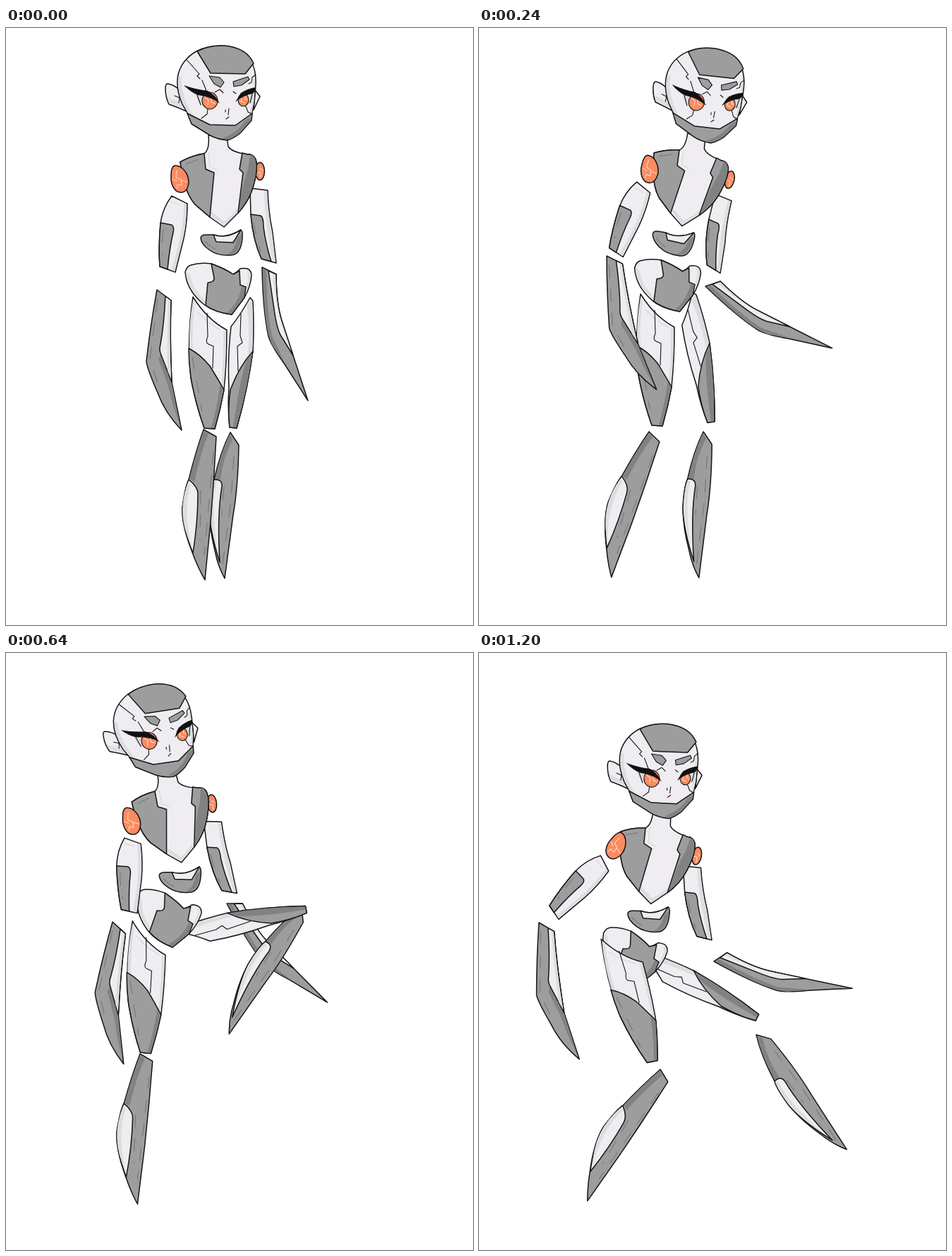
These frames come from a looping animation (662x846 px, 1.32 s). An HTML page:

```html
<!DOCTYPE html>
<html lang="en">
<head>
<meta charset="utf-8">
<title>Robot poses</title>
<style>
html, body { margin: 0; width: 100%; height: 100%; overflow: hidden; background: #fff }
svg { display: block; width: 100%; height: 100% }
path, ellipse { fill: none; stroke: #151515; stroke-width: 1.5; stroke-linejoin: round; stroke-linecap: round }
.light { fill: #efedf1 }
.dark { fill: #9d9d9d }
.orange { fill: #fb8b60 }
.ink { fill: #111; stroke: none }
.shade { fill: #dddddf; stroke: none }
.deep { fill: #828282; stroke: none }
.glow { stroke: #ffd3bd; stroke-width: 1.2 }
.fine { stroke-width: 1.1 }
.scuff { stroke: #777; stroke-width: 1.1; stroke-dasharray: 18 16 }
.soft { stroke: #d8d8da; stroke-width: 1.3 }
</style>
</head>
<body>
<!-- data-pin: the joint a part turns about; data-on: the part that carries this joint -->
<svg viewBox="0 0 662 846">
  <g id="forearmR" data-pin="363 339">
    <path class="dark" d="M363 339L383 349Q383 390 391 415L407 464L428 528L394 475Q376 450 372 437Q364 400 363 339Z"/>
    <path class="deep" d="M364 340L369 343Q370 405 377 436L396 476L379 452Q365 430 364 340Z"/>
    <path class="light" d="M372 344L383 349Q383 390 391 415L407 464L389 435Q384 425 381 405Z"/>
    <path class="shade" d="M378 348L382 350Q382 390 390 415L404 457Q384 415 378 348Z"/>
  </g>
  <g id="armR" data-pin="371 230" data-on="torso">
    <path class="light" d="M346 227L371 230Q372 262 378 290L383 333L362 327Q350 300 347 264Z"/>
    <path class="shade" d="M366 231L370 231Q371 262 377 290L382 331L378 330Q367 275 366 231Z"/>
    <path class="dark" d="M347 264L361 266Q365 268 365 282Q368 305 376 331L362 327Q350 300 347 264Z"/>
    <path class="scuff" d="M351 275Q354 298 361 316"/>
  </g>
  <g id="shinR" data-pin="318 573">
    <path class="dark" d="M318 573L330 591Q329 650 322 690L310 780Q300 762 296 740Q286 700 289 672Q291 650 295 640Q304 600 318 573Z"/>
    <path class="deep" d="M317 576L322 582Q307 610 304 640L296 640Q304 602 317 576Z"/>
    <path class="light" d="M295 640Q307 639 306 650Q299 690 303 757Q288 710 288 680Q290 650 295 640Z"/>
    <path class="shade" d="M295 642L299 643Q290 672 299 737Q282 680 295 642Z"/>
    <path class="scuff" d="M323 607L319 668L307 760M309 650L306 690"/>
  </g>
  <g id="shinL" data-pin="280 569">
    <path class="dark" d="M280 569L298 579Q295 640 290 700L282 782Q272 765 264 743Q249 705 250 680Q254 650 259 640Q269 600 280 569Z"/>
    <path class="deep" d="M280 571L287 575Q275 605 267 643L260 639Q269 602 280 571Z"/>
    <path class="light" d="M259 640Q272 650 272 660Q272 700 265 744Q249 705 250 680Q254 650 259 640Z"/>
    <path class="shade" d="M258 644L262 647Q250 685 264 736Q240 690 258 644Z"/>
    <path class="scuff" d="M294 600L288 670L281 747M276 655L275 725"/>
  </g>
  <g id="thighR" data-pin="319 424">
    <path class="light" d="M346 382L350 387Q352 425 350 458Q342 515 327 567L317 566Q314 540 316 510Q314 465 319 423Q330 410 346 382Z"/>
    <path class="shade" d="M345 386L349 389Q351 425 349 457L343 464Q346 420 341 392Z"/>
    <path class="fine" d="M333 405L332 436L335 446L328 451L329 486"/>
    <path class="dark" d="M350 458Q330 480 318 513Q314 540 317 566L327 567Q342 515 350 458Z"/>
    <path class="deep" d="M349 461Q342 515 326 566L322 566Q331 500 341 471Z"/>
  </g>
  <g id="thighL" data-pin="313 428">
    <path class="light" d="M265 381Q285 413 313 428Q313 475 309 512Q304 540 296 568L281 567Q268 530 262 495Q256 440 265 381Z"/>
    <path class="shade" d="M265 386L268 390Q263 425 265 457L260 454Q259 418 265 386ZM308 428L312 430Q312 475 308 510L305 506Q309 465 308 428Z"/>
    <path class="soft" d="M271 402Q285 418 304 428"/>
    <path class="fine" d="M285 404L286 437Q282 446 287 448L294 451L293 482"/>
    <path class="dark" d="M259 454Q275 462 289 479Q302 500 309 513Q304 540 296 568L281 567Q268 530 262 495Q259 475 259 454Z"/>
    <path class="deep" d="M308 514Q303 540 295 567L291 567Q301 530 303 506Z"/>
    <path class="scuff" d="M264 466L278 543"/>
  </g>
  <g id="pelvis" data-pin="270 334">
    <path class="light" d="M262 336Q275 332 291 334Q310 341 322 349Q328 346 332 341Q347 338 348 350Q347 366 338 382L320 406Q295 403 281 392Q256 372 254 346Q256 338 262 336Z"/>
    <path class="shade" d="M256 346Q258 372 282 391L283 386Q265 372 261 350ZM344 344Q350 352 339 378L340 367Q346 352 341 344Z"/>
    <path class="dark" d="M291 334L295 354Q296 360 286 361L283 393Q297 403 320 406L338 382L340 367L332 364L331 344L322 349Q310 341 291 334Z"/>
    <path class="deep" d="M337 382L320 405L313 404Q331 387 334 366L339 368Z"/>
  </g>
  <g id="belly" data-pin="276 294" data-on="torso">
    <path class="dark" d="M276 298Q276 293 284 293L294 293Q313 299 333 286Q336 288 335 298Q333 322 318 322Q300 323 289 315Q277 307 276 298Z"/>
    <path class="deep" d="M334 292Q333 321 314 321Q325 314 328 297Z"/>
    <path class="light" d="M294 293L298 303L322 304L333 286Q313 299 294 293Z"/>
    <path class="scuff" d="M282 302Q293 315 311 317"/>
  </g>
  <g id="torso" data-pin="281 178">
    <ellipse class="orange" cx="360" cy="203" rx="6.5" ry="12.5"/>
    <path class="glow" d="M356 204L361 205L361 212M360 199L364 202"/>
    <path class="light" d="M287 152Q289 172 281 178Q262 181 247 190Q252 232 268 250L289 268L309 282L329 262Q344 246 350 226Q358 200 354 186Q350 178 342 179Q320 176 315 168L313 155Z"/>
    <path class="shade" d="M291 266L309 280L328 261L329 254Q317 269 309 274L291 260Z"/>
    <path class="soft" d="M287 177L289 197L300 201"/>
    <path class="dark" d="M281 178L283 200L295 205L289 268L268 250Q252 232 247 190Q262 181 281 178Z"/>
    <path class="scuff" d="M255 193L276 185"/>
    <path class="dark" d="M335 177L331 200L336 205L329 262Q344 246 350 226Q358 200 354 186Q350 178 342 179Z"/>
    <path class="deep" d="M346 180Q350 179 353 186Q357 200 349 226Q343 245 330 260Q334 225 343 200Z"/>
  </g>
  <g id="orb" data-pin="246 214" data-on="torso">
    <path class="orange" d="M239 195C250 194 259 207 259 219C258 228 254 233 248 233C239 233 233 222 234 209C234 201 236 196 239 195Z"/>
    <path class="glow" d="M242 202L241 212L248 215L249 223L243 222L242 227M236 214L242 217M249 216L256 218"/>
  </g>
  <g id="armL" data-pin="235 238" data-on="torso">
    <path class="light" d="M235 238L257 249Q257 275 252 298L240 346L218 338Q216 310 219 277Q222 255 235 238Z"/>
    <path class="shade" d="M252 248L256 250Q256 275 251 298L239 345L234 343Q252 290 252 248Z"/>
    <path class="soft" d="M234 246L247 251"/>
    <path class="dark" d="M219 276L235 279Q239 282 237 290Q232 310 229 342L218 338Q216 310 219 276Z"/>
    <path class="scuff" d="M223 286Q220 306 222 323"/>
  </g>
  <g id="forearmL" data-pin="214 371">
    <path class="dark" d="M214 371L234 386Q232 440 235 502L249 570Q225 545 215 517Q199 480 199 472Q205 420 214 371Z"/>
    <path class="deep" d="M219 463L235 504L247 565L236 532Q231 507 216 470Z"/>
    <path class="light" d="M226 380L234 386Q232 440 235 502L219 461Q217 455 219 448Q224 420 226 380Z"/>
    <path class="shade" d="M230 385L233 387Q231 440 234 497L229 486Q228 440 230 385Z"/>
    <path class="scuff" d="M215 384L204 470L216 506"/>
  </g>
  <g id="head" data-pin="313 102" data-on="torso">
    <path class="light" d="M353 88L360 97L351 116Z"/>
    <path class="light" d="M249 90Q238 80 229 79Q226 79 226 86Q226 98 231 108Q245 113 258 119Z"/>
    <path class="shade" d="M229 98L232 106Q245 111 256 116L252 108Z"/>
    <path class="fine" d="M239 96L251 101M247 92L245 106"/>
    <path class="light" d="M258 122L250 108Q240 85 244 66Q249 45 270 33Q290 23 313 26Q338 29 347 46Q355 60 354 80L352 106L348 124L325 139L289 138Z"/>
    <path class="shade" d="M245 68Q242 88 251 107L259 121L265 123Q247 96 249 68ZM350 70L353 75L351 106L348 121L344 123Q352 100 350 70Z"/>
    <path class="dark" d="M271 33L290 64L339 65L351 50Q341 28 310 25Q287 24 271 33Z"/>
    <path class="fine" d="M256 45L274 65L271 68L275 72M354 66L349 70L348 77L344 79M278 74L284 89M296 91L303 87L308 92M326 93L322 90M286 115L285 122L277 128M340 111L343 119L349 122"/>
    <path class="dark fine" d="M288 68L303 70L309 77L304 84L295 79ZM323 83L322 76L343 69L345 73L334 81Z"/>
    <path class="shade" d="M268 93L283 93L281 111Q271 108 268 93ZM344 95L351 91L349 106L343 108Z"/>
    <path class="fine" d="M271 95L276 109M349 94L346 106"/>
    <ellipse class="orange fine" cx="289" cy="103" rx="11" ry="12"/>
    <ellipse class="orange fine" cx="336.500" cy="102" rx="7.500" ry="9"/>
    <path class="glow" d="M282 98L287 102L286 109M291 97L291 105L296 107M294 100L298 103M334 98L333 104L338 106M339 97L339 101L342 102"/>
    <path class="ink" d="M252 81Q268 87 286 89Q297 95 303 107Q290 97 272 95Q262 91 252 81ZM354 84Q342 86 333 92L325 105Q337 95 350 93L354 88Z"/>
    <path class="fine" d="M311 116L311 119M316 114L315 123M312 129L316 126"/>
    <path class="dark" d="M257 121L289 137L325 138L349 121L348 131L332 149Q322 157 314 159Q300 158 289 152L263 136Z"/>
    <path class="deep" d="M348 125L347 131L332 148Q322 156 314 158L307 156Q328 149 339 131Z"/>
  </g>
</svg>
<script>
// Each key pose starts at a time and moves parts from rest: [turn, dx, dy].
const poses = [
  { start: 0 },
  { start: 240, torso: [13, 3, -5], head: [5], orb: [12], belly: [10, -6, 3], pelvis: [2, -33, -6],
    armL: [13, -2, -3], forearmL: [-10.5, -33, -48], armR: [15.5, -2, 1], forearmR: [-45, -42, 27],
    thighL: [0, -36, -4], shinL: [15, -39, 3], thighR: [-15.5, -31, -2], shinR: [-0.5, 0, -1] },
  { start: 440, torso: [8.5, 9, 44], head: [4.5], orb: [8, 0, -2], belly: [6, -4, 2], pelvis: [2, -6, 50],
    armL: [10.5, 0, -3], forearmL: [-29.5, -12, 9], armR: [11], forearmR: [-49, -21, 72],
    thighL: [-22, -15, 35], shinL: [38, 37, 41], thighR: [-43.5, 2, 38], shinR: [19.5, 102, -6] },
  { start: 640, torso: [-5.5, -70, 18], head: [-10, -9, 2], orb: [-2, -2, 3], belly: [-1], pelvis: [14, -65, 1],
    armL: [-7, -3, 2], forearmL: [5.5, -63, 10], armR: [-5.5], forearmR: [-26.5, -50, 16],
    thighL: [1.5, -87, 0], shinL: [1.5, -90, -1], thighR: [-107, -29, -16], shinR: [27.5, 101, -213] },
  { start: 1200, torso: [11, -45, 70], head: [1, -13, -2], orb: [41, 0, -3], belly: [2, 2, 5], pelvis: [14, -75, 55],
    armL: [36, -7, -11], forearmL: [-6.5, -129, 11], armR: [-2, 0, -12], forearmR: [-60, -30, 98],
    thighL: [-15.5, -81, 10], shinL: [29.5, -23, 21], thighR: [-68, -58, 42], shinR: [-40.5, 75, -32] }
];
const loop = 1320;
const $ = id => document.getElementById(id);
const parts = [...document.querySelectorAll('g')];
const pinOf = part => part.dataset.pin.split(' ').map(Number);

// Where a part's joint lies: carried round by its parent, then shifted.
function place(part, pose) {
  const [, dx = 0, dy = 0] = pose[part.id] || [];
  let [x, y] = pinOf(part);
  if (part.dataset.on) {
    const parent = $(part.dataset.on), [px, py] = pinOf(parent), [qx, qy] = place(parent, pose);
    const turn = (pose[parent.id]?.[0] || 0) * Math.PI / 180, c = Math.cos(turn), s = Math.sin(turn);
    [x, y] = [qx + (x - px) * c - (y - py) * s, qy + (x - px) * s + (y - py) * c];
  }
  return [x + dx, y + dy];
}

function show(pose) {
  for (const part of parts) {
    const [x, y] = pinOf(part), turn = pose[part.id]?.[0] || 0;
    part.setAttribute('transform', `translate(${place(part, pose)}) rotate(${turn}) translate(${-x} ${-y})`);
  }
  // In the last pose the left thigh crosses in front of the pelvis.
  $('thighL')[pose === poses.at(-1) ? 'before' : 'after']($('pelvis'));
}

let shown;
function tick() {
  const t = performance.now() % loop;
  const pose = poses.findLast(p => p.start <= t);
  if (pose !== shown) show(shown = pose);
  requestAnimationFrame(tick);
}
tick();
</script>
</body>
</html>
```
